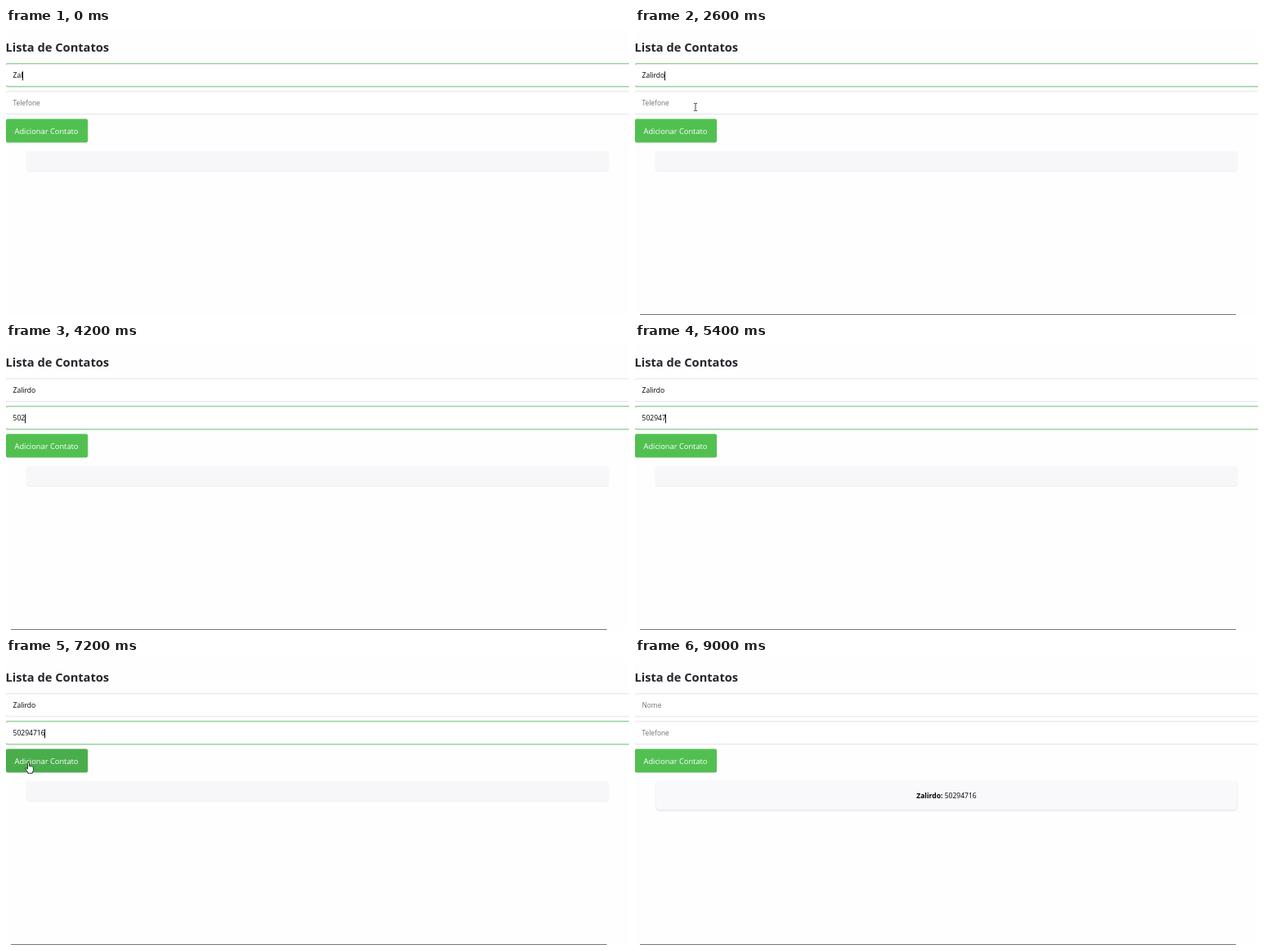
Animation of 762 by 352 pixels, one loop 9900 ms. Source, as an HTML page:

```html
<!DOCTYPE html>
<html lang="pt-BR">
<head>
<meta charset="utf-8">
<title>Lista de Contatos</title>
<style>
  html, body { margin: 0; width: 100%; height: 100%; overflow: hidden; background: #fefefe; }
  #stage { position: relative; width: 762px; height: 352px; overflow: hidden; color: #000;
    font: 500 8.55px "Open Sans", "Noto Sans", sans-serif; white-space: pre; }
  #stage > * { position: absolute; box-sizing: border-box; margin: 0; }
  h1 { left: -.5px; top: 0; font-size: 14.65px; font-weight: 700; line-height: 46px; color: #25282d; }
  .field { left: -1px; width: 780px; height: 29px; padding-left: 8.5px; line-height: 28.5px;
    border: 1px solid #e2e3e9; border-radius: 3px; background: #fff; transform: translateY(.3px); }
  .field.focus { border-color: #80c583; box-shadow: 0 0 1px #a5d6a6; }
  .hint { font-size: 8.4px; font-weight: 400; color: #707070; }
  .caret { display: inline-block; width: 1px; height: 11px; margin: 0 -.5px;
    vertical-align: -2.5px; background: #111; }
  #name { top: 43px; }
  #phone { top: 77px; }
  #add { left: 0; top: 112px; width: 100px; height: 29px; border-radius: 2px; transform: translateY(-.4px);
    font-size: 9.3px; line-height: 30px; padding-left: 10.5px; color: #fff; }
  #list { left: 25px; top: 151px; width: 712px; height: 24px; border-radius: 4px;
    background: #f7f7fa; box-shadow: 0 1px 2px rgba(0, 0, 0, .07);
    text-align: center; line-height: 37px; font-weight: 400; }
  #list.full { left: 26px; width: 710px; height: 35px; background: #f9f9fc;
    box-shadow: 0 1px 3px rgba(0, 0, 0, .13); }
  #edge { left: 6px; top: 351px; width: 729px; height: 1px; }
  #mouse { left: 0; top: 0; width: 12px; height: 16px; overflow: visible; }
</style>
</head>
<body>
<div id="stage">
  <h1>Lista de Contatos</h1>
  <div id="name" class="field"></div>
  <div id="phone" class="field"></div>
  <div id="add">Adicionar Contato</div>
  <div id="list"></div>
  <div id="edge"></div>
  <svg id="mouse"><path id="shape" stroke-linejoin="round"/></svg>
</div>
<script>
const LOOP = 9900, STEP = 100;
const NAME = "Zalirdo", PHONE = "50294716";
const nameKeys = [0, 0, 0, 100, 400, 800, 1200];
const phoneKeys = [3700, 4000, 4200, 4500, 5100, 5300, 5800, 6000];
const PHONE_FOCUS = 2900, PRESS = 7600, ADDED = 7800;

// Each path has its hot spot at 0,0.
const shapes = {
  beam: { d: "M-2-4.5H-.5L0-4 .5-4.5H2M0-4V4M-2 4.5H-.5L0 4 .5 4.5H2", fill: "none", stroke: "#333", w: .9 },
  arrow: { d: "M0 0V11L2.6 8.6 4.3 12.4 5.9 11.7 4.2 8H7.6Z", fill: "#fff", stroke: "#222", w: .8 },
  hand: { d: "M-1 1Q0-.4 1 1V5Q2 4 3 5.2 4 4.4 4.8 5.6 6 5 6 6.6V9.5Q6 11 4.8 12V13.5H-.8V12Q-2 10.8-3.8 8Q-4 6.6-2.6 7L-1 8.4Z",
    fill: "#fff", stroke: "#222", w: .9 }
};

// Pointer runs: points of [time, x, y, shape], hidden after "end".
const runs = [
  { end: 3400, points: [[1800, 97, 85, "beam"], [1900, 89.5, 92.5, "beam"], [2200, 78, 109, "arrow"],
    [2400, 76, 101, "beam"], [2600, 74, 97, "beam"]] },
  { end: 9000, points: [[6600, 12, 142, "arrow"], [6700, 15, 138.7, "hand"], [7300, 30, 125.7, "hand"],
    [8500, 30, 125.7, "hand"], [8600, 125, 129, "arrow"], [8700, 265, 127, "arrow"],
    [8800, 370, 62, "arrow"], [8900, 396, 8, "arrow"]] }
];

const $ = id => document.getElementById(id);
const clamp = v => Math.min(1, Math.max(0, v));
const typed = (text, keys, t) => text.slice(0, keys.filter(k => k <= t).length);

function pointerAt(t) {
  const run = runs.find(r => t >= r.points[0][0] && t < r.end);
  if (!run) return null;
  const i = run.points.findLastIndex(p => p[0] <= t);
  const a = run.points[i], b = run.points[i + 1] || a;
  const k = a === b ? 0 : (t - a[0]) / (b[0] - a[0]);
  return { x: a[1] + (b[1] - a[1]) * k, y: a[2] + (b[2] - a[2]) * k, shape: a[3] };
}

// The caret restarts its blink at every key press.
function caretOn(t) {
  const since = [...nameKeys, PHONE_FOCUS, ...phoneKeys].filter(k => k <= t).pop();
  return Math.floor((t - since) / 600) % 2 === 0 && !(t >= 3400 && t < 3700);
}

function drawField(el, text, hint, focus, blink) {
  const caret = focus && blink ? '<span class="caret"></span>' : "";
  const html = text ? text + caret : caret + `<span class="hint">${hint}</span>`;
  if (el.html !== html) el.innerHTML = el.html = html;
  el.classList.toggle("focus", focus);
}

function drawPointer(p) {
  $("mouse").style.display = p ? "block" : "none";
  if (!p) return;
  const s = shapes[p.shape], path = $("shape");
  path.setAttribute("d", s.d);
  path.setAttribute("fill", s.fill);
  path.setAttribute("stroke", s.stroke);
  path.setAttribute("stroke-width", s.w);
  path.setAttribute("transform", `translate(${p.x} ${p.y})`);
}

function edgeColor(t) {
  if (t < 1800) return "transparent";
  return t < 2200 || (t >= 5500 && t < 6900) ? "#b0b0b0" : "#777";
}

function draw(now) {
  const t = Math.floor((now % LOOP) / STEP) * STEP;
  const added = t >= ADDED, blink = caretOn(t);
  const onPhone = t >= PHONE_FOCUS && t < PRESS;
  drawField($("name"), added ? "" : typed(NAME, nameKeys, t), "Nome", t < PHONE_FOCUS, blink);
  drawField($("phone"), added ? "" : typed(PHONE, phoneKeys, t), "Telefone", onPhone,
    blink || (t >= 6600 && t < 7000));

  const hover = clamp((t - 6600) / 300) - clamp((t - 8500) / 300);
  const mix = (a, b) => Math.round(a + (b - a) * hover);
  $("add").style.background = `rgb(${mix(81, 74)},${mix(192, 173)},${mix(81, 76)})`;

  const item = added ? `<b>${NAME}:</b> ${PHONE}` : "";
  const list = $("list");
  if (list.item !== item) list.innerHTML = list.item = item;
  list.classList.toggle("full", added);
  $("edge").style.background = edgeColor(t);
  drawPointer(pointerAt(t));
}

const start = performance.now();
function tick() {
  draw(performance.now() - start);
  requestAnimationFrame(tick);
}
tick();
</script>
</body>
</html>
```
